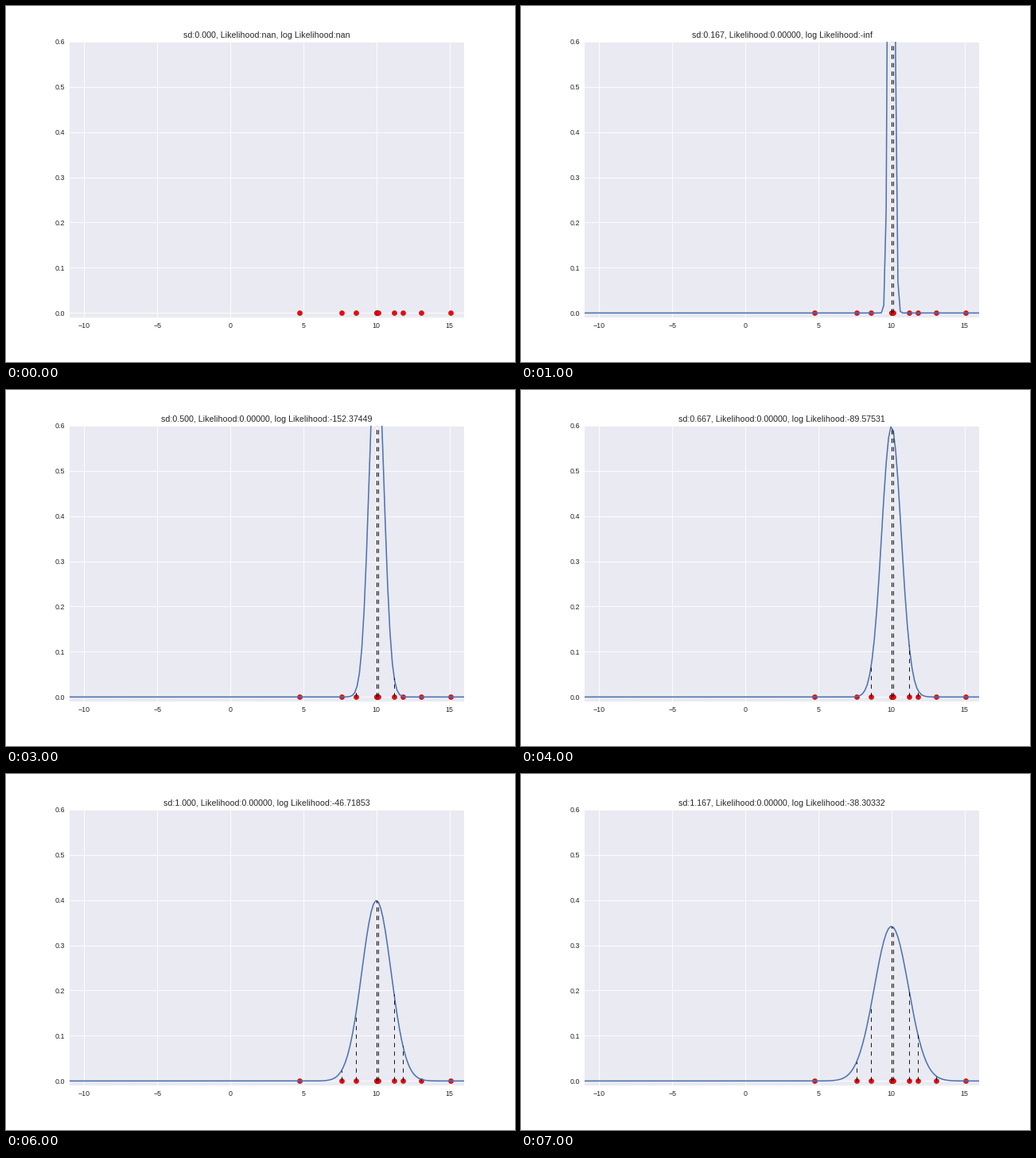
Write a matplotlib script that moves like this. It is 640x448 px and loops after 8 s.

```python
import numpy as np
import matplotlib.pyplot as plt
from matplotlib.animation import FuncAnimation

plt.rcParams.update({
    "font.family": "Liberation Sans",
    "font.size": 10,
    "text.color": "0.15",
})

MEAN = 10
FRAMES = 8
SQUARES = 75.0582883  # sum of squared deviations of the sample

sample = np.array([7.62, 8.6, 9.99, 10.0, 10.12, 11.21, 11.81, 13.06, 15.08])
lowest = MEAN - np.sqrt(SQUARES - np.sum((sample - MEAN) ** 2))
sample = np.append(lowest, sample)
grid = 9.638 + 0.1612 * np.arange(-129, 41)


def density(x, sd):
    return np.exp(-0.5 * ((x - MEAN) / sd) ** 2) / (sd * np.sqrt(2 * np.pi))


fig = plt.figure(figsize=(10, 7), dpi=64, facecolor="white")
ax = fig.add_axes([0.125, 0.125, 0.775, 0.775], facecolor="#EAEAF2")
ax.set_xlim(-11, 16)
ax.set_ylim(-0.01, 0.6)
ax.set_xticks(range(-10, 16, 5))
ax.set_yticks(np.arange(7) / 10)
ax.tick_params(length=0, pad=7, labelsize=10, labelcolor="0.15")
ax.set_axisbelow(True)
ax.grid(color="white", linewidth=1, linestyle="-")
ax.spines[:].set_visible(False)

ax.scatter(sample, np.zeros_like(sample), s=49, color="red",
           edgecolors="black", linewidths=0.3, zorder=1)
curve, = ax.plot([], [], color="#4C72B0", linewidth=1.75, zorder=2)
stems = ax.vlines(sample, 0, 0, colors="black", linewidths=1,
                  linestyles=(0, (6, 6)), zorder=2.1)
title = ax.set_title("", fontsize=12, pad=5)


def update(step):
    sd = np.float64(step) / 6
    with np.errstate(all="ignore"):
        heights = density(sample, sd)
        likelihood = np.prod(heights)
        log_likelihood = np.log(likelihood)
        curve.set_data(grid, density(grid, sd))
    if step:
        stems.set_segments([[(x, 0), (x, h)] for x, h in zip(sample, heights)])
    else:
        stems.set_segments([])
    title.set_text(f"sd:{sd:.3f}, Likelihood:{likelihood:.5f}, "
                   f"log Likelihood:{log_likelihood:.5f}")
    return curve, stems, title


anim = FuncAnimation(fig, update, frames=FRAMES, interval=1000,
                     repeat=True, repeat_delay=0, blit=False)
plt.show()
```
